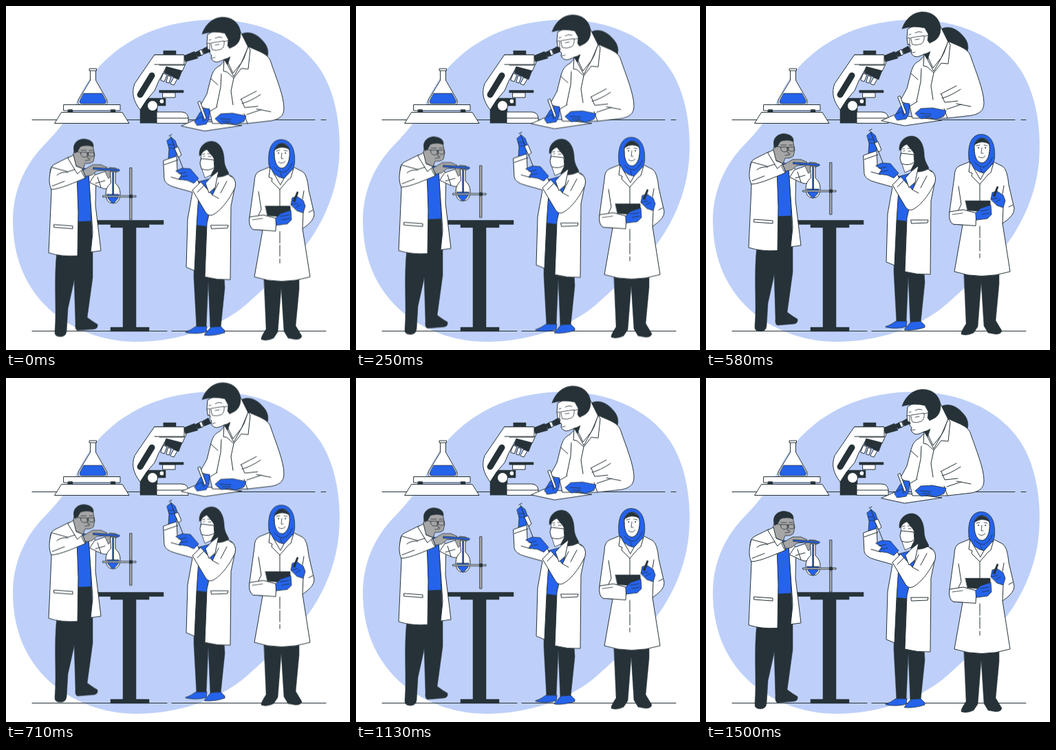
An HTML page for the animation above (1540 ms loop, 500 px wide and 500 px high).

```html
<!DOCTYPE html>
<html lang="en">
<head>
<meta charset="utf-8">
<title>Laboratory team</title>
<style>
  html, body { margin: 0; width: 100%; height: 100%; overflow: hidden; background: #fff; }
  svg { display: block; width: 100vw; height: 100vh; }
  svg * { stroke-linejoin: round; stroke-linecap: round; }
  path, circle { fill: #fff; stroke: #263238; stroke-width: 1; }
  .dark { fill: #263238; stroke-width: .5; }
  .blue { fill: #2563eb; stroke-width: .8; }
  .skin { fill: #a6a6a6; stroke-width: .8; }
  .line { fill: none; }
  .thin { fill: none; stroke-width: .8; }
  .blob { fill: #bed0f9; stroke: none; }
  .slot { fill: none; stroke-width: 9; }
  .float { animation: float 1540ms linear infinite; }
  @keyframes float {
    0%, 100% { transform: translateY(-.3px); }
    47.7% { transform: translateY(-10px); }
    97.4% { transform: translateY(0); }
  }
</style>
</head>
<body>
<svg viewBox="0 0 500 500">
  <path class="blob" d="M10 312C10 268 28 233 49 209C70 187 84 172 100 144C116 112 128 93 150 74C190 38 245 20 302 20C365 20 424 44 456 91C480 127 488 180 484 225C479 285 450 335 420 367C396 391 378 408 350 433C310 468 250 488 190 488C140 488 95 470 62 440C25 405 10 360 10 312Z"/>
  <path class="line" d="M38 165.500H449M458 165.500H465M38 472.500H234M241 472.500H465"/>

  <g id="scale">
    <path class="dark" d="M90 150h7v5h-7zM153 150h6v5h-6z"/>
    <path d="M84 143.500H166V152H84ZM81 154.500H169L179 170.500H71Z"/>
    <path class="dark" d="M90.500 150.500h6v4h-6zM152.500 150.500h6v4h-6z"/>
    <path d="M122.500 93V108L105.500 136Q103 143.500 109 143.500H143Q149 143.500 146.500 136L130.500 108V93Z"/>
    <path class="blue" d="M113 127H139.500L145 137Q146.500 142 142 142H110Q106 142 107.500 137Z"/>
    <path d="M121.500 91H131.500V94H121.500Z"/>
  </g>

  <g id="microscope">
    <path class="dark" d="M195 170V146L203 134H232V145H220V170Z"/>
    <path d="M216 71H258L262 82L256 95L233 89L222 109L216 123L204 137L195 151C185 138 182 126 187 113Z"/>
    <path class="slot" d="M212 101L195 129"/>
    <path class="dark" d="M229 65H247V71H229ZM257 73L274 66L279 76L261 81ZM274 68L282 64L286 71L279 74ZM285 63L294 58L298 66L288 70ZM233 88L256 94L251 107L230 97Z"/>
    <path d="M281 65L284 63L287 70L284 72ZM216 71H259V86H223"/>
    <path class="line" d="M216 85H259"/>
    <path d="M229 98L234 100L230 110L225 108ZM236 101L240 103L237 112L233 111ZM244 104L249 106L244 115L239 113Z"/>
    <path class="dark" d="M223 122.500H258V126H223Z"/>
    <path d="M228 126H246V133H228Z"/>
    <circle cx="213" cy="145" r="7.500"/>
    <circle cx="226.500" cy="138.500" r="3.500"/>
    <path d="M219 170V154H255Q264 154 265 163V170Z"/>
    <path class="line" d="M219 163H265"/>
  </g>

  <g id="table">
    <path class="dark" d="M131 311.500H229V317.500H208V322H189V467H208V473H152V467H170V322H152V317.500H131Z"/>
  </g>

  <g id="writer" class="float">
    <path d="M255 174.500L274 166L343 174L289 182Z"/>
    <path class="dark" d="M339 43C351 34 366 41 375 53C382 61 382 71 379 76C369 73 354 68 344 60Z"/>
    <path d="M354 60C369 67 382 70 385 82C392 103 404 131 404 149C404 161 396 165 386 167L351 171L300 171L296 153L282 146L292 128L298 104C301 95 303 91 311 87L320 77Z"/>
    <path d="M293 42L292 54L293 63L297 65L296 69L299 72L298 76Q302 84 310 81L320 77L330 98L342 83L352 60L340 36L315 30Z"/>
    <path class="dark" d="M285 41C289 28 300 17 314 16.500C331 16 341 28 341 41C341 50 337 56 331 59L325 62L322 58L323 49L318 40Q302 36 285 41Z"/>
    <path class="dark" d="M316 79L326 74L322 86Z"/>
    <path class="thin" d="M292 55L296 54V64L293 64M298 54L317 51Q318 60 313 63Q306 66 300 64ZM317 52L325 50M295 50L298 49M304 47Q309 44 314 46M299 76L304 75M304 57L310 56"/>
    <path d="M317 78L316 95L321 96L331 105L342 91L352 92L355 64L352 59L346 76L331 103L322 86Z"/>
    <path class="line" d="M331 105L327 124L330 144M313 99L312 118L306 147M341 136L364 124M343 142Q355 139 370 129M342 136L347 148L366 146M298 106L308 115M364 150L385 154M350 158L371 151M282 146L297 153L307 147M346 157L351 171"/>
    <path class="blue" d="M274 168L282 155L289 149L296 150L295 164L291 172L278 174Z"/>
    <path class="blue" d="M304 164L312 157L329 156L349 160L346 168L333 173L325 170L313 172L309 169Z"/>
    <path d="M279 140L282 138.500L291 163L289 166Z"/>
    <path class="thin" d="M277 165L285 161L287 168M311 164L327 165M314 168L326 168"/>
  </g>

  <g id="chemist" class="float">
    <path class="dark" d="M74 356L105 360L98 404L90 440L88 473Q87 481 79 481Q70 481 71 473C74 440 69 400 74 356ZM99 360L124 310L126 350L126 395L118 453Q126 459 133 463Q134 469 128 470L104 472Q100 471 101 462L99 395Z"/>
    <path class="dark" d="M104 305H124V365H101Z"/>
    <path class="blue" d="M99 232L121 238L124 313L104 314Z"/>
    <path d="M120 238L131 246L130 290L138 356L123 358L126 330Z"/>
    <path d="M129 246L146 240L153 250V262Q148 269 137 264L122 257Z"/>
    <path d="M91 220L71 230Q64 233 64 244L66 270L62 359Q80 365 104 363.500L105 300L103 243Z"/>
    <path d="M66 235C62 249 62 259 66 267C80 266 99 257 116 250L110 235L90 241Z"/>
    <path class="line" d="M70 318L97 320V324L70 322ZM90 242Q80 241 74 246M109 236Q110 244 115 250M67 262L85 255M133 249L138 264M130 258L144 254"/>
    <path class="skin" d="M97 219L101 204L126 202L129 217L127 226Q123 230 115 229L112 237L101 232Z"/>
    <path d="M90 221L98 217L102 233L112 237L104 244Z"/>
    <path class="dark" d="M100 214C95 203 102 194 113 193.500C123 194 128 199 127 205Q116 201 108 205L104 212Z"/>
    <path class="thin" d="M104 212L109 213.500M109 213H118V219Q112 222 109 217ZM120 213H128V218Q123 221 120 217ZM118 214H120M119 214V222L122 222M115 225L122 224M109 210L117 210M121 210L126 210"/>
    <path class="skin" d="M112 239L126 231L138 231L147 235L143 239L132 240L125 246L116 248Z"/>
    <path class="skin" d="M144 240L151 235L160 236L164 240L156 244L149 251Z"/>
    <path d="M152 241H159V258Q166 264 166 273Q166 287 155.500 287Q145 287 145 273Q145 264 152 258Z"/>
    <path class="blue" d="M147 274H164Q164 282 155.500 287Q147 282 147 274ZM155 242H156.500V274H155Z"/>
    <path class="blue" d="M127 235L164 237.500Q167 239 164 240.500L127 237.500Z"/>
    <path class="skin" d="M180 235.500H183V311H180Z"/>
    <path d="M141 276H189V278H141Z"/>
    <circle class="dark" cx="181.500" cy="277" r="2.600"/>
  </g>

  <g id="sampler" class="float">
    <path class="dark" d="M274 318L295 316L292 370L317 392L318 410L312 468L297 470L294 400L291 468L277 469L273 395Z"/>
    <path class="blue" d="M261 474Q268 472 276 466L292 466L291 474Q278 478 262 475ZM289 477L298 467L312 466L318 472V475Q304 480 289 479Z"/>
    <path class="blue" d="M279 256L305 249L300 285L292 321L276 319Z"/>
    <path d="M229 225L248 218L249 239L279 254L281 260L277 320L274 385L262 380L264 310L271 271L246 264Q231 260 230 252Z"/>
    <path d="M308 241L325 246Q334 249 333 262L327 291L326 398Q307 399 289 394L292 316L303 270L304 249Z"/>
    <path d="M325 247Q336 251 333 264C324 283 311 299 300 304Q294 306 290 300L271 268L283 256L300 275L309 257"/>
    <path class="line" d="M230 231L250 224M278 271L288 261M298 319H323L322 323L299 324ZM321 255L312 272M300 275L309 280M240 249L254 253"/>
    <path class="dark" d="M281 217C280 207 287 198 297 197C309 196 316 207 317 221C317 234 322 238 324 244Q316 250 303 249L291 245L301 230L297 218Z"/>
    <path class="thin" style="fill:#fff" d="M284 215L290 207L298 210L303 223L303 236L298 246L289 250L285 238L283 229Z"/>
    <path class="dark" d="M281 218Q283 207 295 205Q304 213 305 228L301 220L292 209Q286 211 281 218Z"/>
    <path d="M284 222L302 224L303 235Q295 241 284 237L282 229Z"/>
    <path class="thin" d="M302 224L306 222M303 235L307 231M287 219L289 218M294 219L298 219M285 216L289 215M293 215L298 215"/>
    <path d="M300 247L309 240L304 264L295 272L290 258Z"/>
    <path class="blue" d="M234 196L240 191L246 196L250 207L247 219L236 222L237 208Z"/>
    <path class="line" d="M239 190L258 238M237 189L241 187"/>
    <path d="M245 207L250 205L255 217L251 220Z"/>
    <path class="blue" d="M247 240L256 236L268 237L280 251L273 258L264 254L251 252L255 246Z"/>
    <path class="thin" d="M236 202L244 202M237 207L245 207M251 244L262 242M254 249L264 247"/>
  </g>

  <g id="recorder" class="float">
    <path class="dark" d="M375 396H426V412L421 465L430 480Q429 485 421 485L410 483L404 473L400 410L395 474L389 483Q379 488 371 485Q370 482 378 470Z"/>
    <path d="M384 234L369 240Q361 243 361 256L354 307Q353 322 359 325L373 326L361 394Q400 407 442 394L431 324Q449 312 448 302L440 268Q438 245 431 241L417 234Z"/>
    <path class="blue" d="M382 230C380 207 387 194.500 400 194.500C414 194.500 421 208 419.500 229C418 241 411 243 404 251L397 249C388 243 383 241 382 230Z"/>
    <path d="M390 216C389 204 395 200 402 200C410 200 413 208 412 219C411 231 405 236 401 236C395 236 390 228 390 216Z"/>
    <path class="dark" d="M390 210Q393 201 401 200Q409 201 412 209Q401 202 390 210Z"/>
    <path class="thin" d="M393 211L398 210M404 210L409 211M401 214L400 222L403 222M396 227Q401 231 406 226M390 235Q396 242 404 242Q413 238 416 228M399 243L401 250"/>
    <circle class="dark" cx="396" cy="214" r=".7"/>
    <circle class="dark" cx="406" cy="214" r=".7"/>
    <path d="M384 235L382 249L387 251L386 255L398 267L410 253L414 250L418 236L404 251L399 260Z"/>
    <path class="line" d="M398 267V292M398 328V345M398 348V364M398 368V374M367 270L371 296L365 309M373 326L376 309M431 324L432 301M356 308L366 310M433 269L431 281M440 300L446 297"/>
    <path class="dark" d="M377 291L413 291L414 308L380 305Z"/>
    <path d="M359 325Q352 321 354 307L374 304L393 309L392 327Z"/>
    <path class="blue" d="M392 309L399 302L414 297L415 311L409 317L393 319Z"/>
    <path class="blue" d="M414 289L416 279L423 277L432 283L435 291L432 301L423 298Z"/>
    <path class="dark" d="M417 284L423 270L425 271L420 285Z"/>
    <path class="thin" d="M358 311L373 309M399 306L411 304M401 311L412 309M415 289L424 287M421 293L428 289"/>
  </g>
</svg>
</body>
</html>
```
